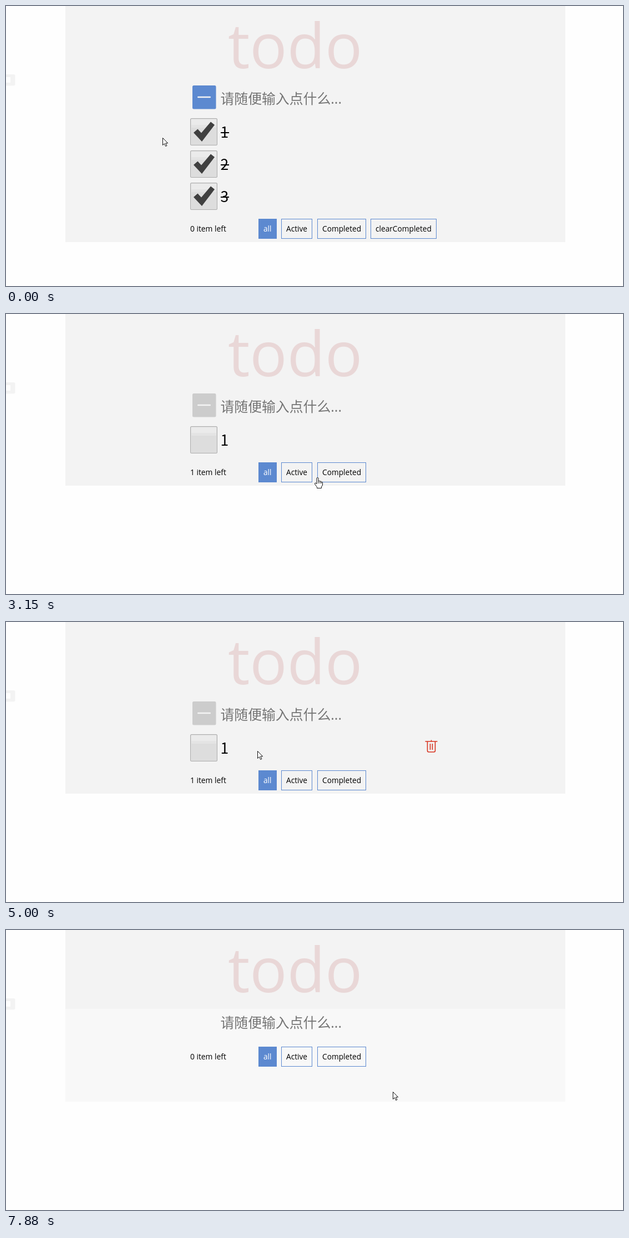
These frames come from a looping animation (1112 px wide and 504 px high, 8 s). An HTML page with a canvas:

```html
<!DOCTYPE html>
<html lang="zh">
<head>
<meta charset="utf-8">
<title>todo</title>
<style>
html, body { margin: 0; width: 100%; height: 100%; overflow: hidden; background: #fefefe; }
canvas { display: block; }
</style>
</head>
<body>
<canvas id="stage" width="1112" height="504"></canvas>
<script>
const ctx = document.getElementById('stage').getContext('2d');
const LOOP = 8000;
const ROW = 57.75;
const BUTTON_HEIGHT = 36;
const BLUE = '#5c89d0';
const LATIN = '"Open Sans", "Noto Sans", sans-serif';
const CJK = '"Noto Sans CJK SC", "Noto Sans CJK", "Noto Sans CJK JP", sans-serif';

const ARROW = new Path2D('M.5 .5V13.5L3.5 10.7L5.7 15.5L7.9 14.5L5.7 9.9H9.7Z');
const HAND = new Path2D('M-2 11V1Q-2-.5-.5-.5T1 1V6Q2.5 4.5 4 6.3Q5.6 5.3 6.4 7.2Q8.5 6.7 8.5 9V13L6.5 16V18.5H-1.5V16.5L-5.5 11Q-5.5 8.5-3.7 9.2Z');
const KNUCKLES = new Path2D('M1 6V10M4 6.5V10M6.4 7.5V10');
const CHECK = new Path2D('M6 26L13.5 19.5L20 26.5L37 6.5L44 12L21 42Z');
const TRASH = new Path2D('M0 3.5H22M11 3.5V1M4 3.5V20Q4 22.5 6.5 22.5H15.5Q18 22.5 18 20V3.5M9 7.5V18.5M13 7.5V18.5');

const easeOut = k => 1 - (1 - k) ** 2;
const smooth = k => k * k * (3 - 2 * k);

const glide = (from, to, x, y, ease = easeOut) => ({ from, to, x, y, ease });
const HOME = { x: 282, y: 237 };
const GLIDES = [
  glide(500, 790, 357, 231),
  glide(1480, 2260, 707, 390),
  glide(2690, 3380, 544, 283),
  glide(3500, 3720, 596, 291),
  glide(4030, 4500, 375, 177),
  glide(4500, 4830, 470, 232),
  glide(4880, 5380, 357, 231, smooth),
  glide(5380, 5670, 407, 236, smooth),
  glide(5720, 5950, 523, 291),
  glide(6090, 6450, 428, 264, smooth),
  glide(6450, 6840, 546, 283, smooth),
  glide(6960, 7340, 687, 300, smooth),
  glide(7550, 7700, 697, 291)
];

function pointerAt(time) {
  let { x, y } = HOME;
  for (const move of GLIDES.filter(({ from }) => from < time)) {
    const k = move.ease(Math.min(1, (time - move.from) / (move.to - move.from)));
    x += (move.x - x) * k;
    y += (move.y - y) * k;
  }
  return { x: Math.round(x), y: Math.round(y) };
}

function stateAt(time) {
  let items = ['1', '2', '3'].map(name => ({ name, done: true }));
  items[0].done = time < 1480 || time >= 5350;
  if (time >= 2690) items = items.slice(0, 1);
  if (time >= 7880) items = [];
  const filter = time >= 4030 && time < 4880 ? 'Completed' : 'all';
  const shown = items.filter(item => filter === 'all' || item.done);
  return { items, filter, shown, left: items.filter(item => !item.done).length };
}

function setFont(size, family = LATIN) {
  ctx.font = `${size}px ${family}`;
}

function text(str, x, y, size, color, family) {
  setFont(size, family);
  ctx.fillStyle = color;
  ctx.fillText(str, x, y);
  return x + ctx.measureText(str).width;
}

function rect(x, y, w, h, color) {
  ctx.fillStyle = color;
  ctx.fillRect(x, y, w, h);
}

function rounded(x, y, w, h, r, color) {
  ctx.beginPath();
  ctx.roundRect(x, y, w, h, r);
  ctx.fillStyle = color;
  ctx.fill();
}

function at(x, y, draw) {
  ctx.save();
  ctx.translate(x, y);
  draw();
  ctx.restore();
}

function drawPage(height, cleared) {
  rect(0, 0, 1112, 504, '#fefefe');
  rounded(-6, 123, 22.5, 20.5, 3, '#f3f3f3');
  rect(0, 128, 8, 10, '#fefefe');
  if (cleared) rect(107, 142, 901, 167, '#f8f8f8');
  rect(107, 0, 901, cleared ? 142 : height, '#f3f3f3');
  text('todo', 400, 112, 111.5, '#e9d7d7');
  const end = text('请随便输入点什么', 386.5, 175.5, 24.85, '#757575', CJK);
  text('...', end, 175.5, 24.85, '#757575');
}

function drawToggle(active) {
  rounded(336, 143, 42.5, 42.5, 2.5, active ? BLUE : '#cccccc');
  rounded(345, 162.7, 24, 2.6, 1.3, '#f4f4f4');
}

function drawItem(item, y, hovered) {
  at(332, y, () => {
    rounded(0, 0, 49, 49, 2.5, '#adadad');
    rounded(1, 1, 47, 47, 1.5, '#dddddd');
    rect(2, 2, 45, 10, '#ebebeb');
    rect(2, 12, 45, 5, '#e4e4e4');
    if (item.done) {
      ctx.fillStyle = '#404040';
      ctx.fill(CHECK);
    }
  });
  text(item.name, 386.5, y + 35, 26.4, '#000', CJK);
  if (item.done) rect(387, y + 25, 15, 2, '#000');
  if (hovered) at(755.5, y + 9.5, () => {
    ctx.strokeStyle = '#d8321f';
    ctx.lineWidth = 1.6;
    ctx.stroke(TRASH);
  });
}

// Buttons sit in a row, each as wide as its label plus padding.
function layoutButtons(state) {
  const labels = ['all', 'Active', 'Completed'];
  if (state.items.some(item => item.done)) labels.push('clearCompleted');
  setFont(13.7);
  let edge = 455.4;
  return labels.map(label => {
    const x = Math.round(edge);
    edge += ctx.measureText(label).width + 18;
    const w = Math.round(edge) - x;
    edge += 8.4;
    return { label, x, w };
  });
}

function drawButton({ label, x, w }, y, selected) {
  if (selected) rect(x, y, w, BUTTON_HEIGHT, BLUE);
  ctx.strokeStyle = BLUE;
  ctx.lineWidth = 1;
  ctx.strokeRect(x + .5, y + .5, w - 1, BUTTON_HEIGHT - 1);
  text(label, x + 9, y + 23, 13.7, selected ? '#fff' : '#000');
}

function drawPointer({ x, y }, isHand) {
  at(x, y, () => {
    const shape = isHand ? HAND : ARROW;
    ctx.fillStyle = '#fff';
    ctx.strokeStyle = '#111';
    ctx.lineWidth = 1;
    ctx.lineJoin = 'round';
    ctx.fill(shape);
    ctx.stroke(shape);
    if (isHand) ctx.stroke(KNUCKLES);
  });
}

function render(time) {
  const state = stateAt(time);
  const pointer = pointerAt(time);
  const count = state.shown.length;
  const footer = Math.round(209.5 + ROW * count);
  const buttons = layoutButtons(state);
  const over = (x, y, w, h) =>
    pointer.x >= x && pointer.x < x + w && pointer.y >= y && pointer.y < y + h;

  drawPage(Math.round(251.3 + ROW * count), !state.items.length);
  if (state.items.length) drawToggle(state.left === 0);

  state.shown.forEach((item, i) => {
    const y = Math.round(202.3 + ROW * i);
    drawItem(item, y, over(332, y, 448, ROW));
  });

  text(`${state.left} item left`, 332, footer + 23, 13.8, '#000');
  buttons.forEach(button => drawButton(button, footer, button.label === state.filter));
  drawPointer(pointer, buttons.some(({ x, w }) => over(x, footer, w, BUTTON_HEIGHT)));
}

const start = performance.now();
function frame() {
  render((performance.now() - start) % LOOP);
  requestAnimationFrame(frame);
}
frame();
</script>
</body>
</html>
```
